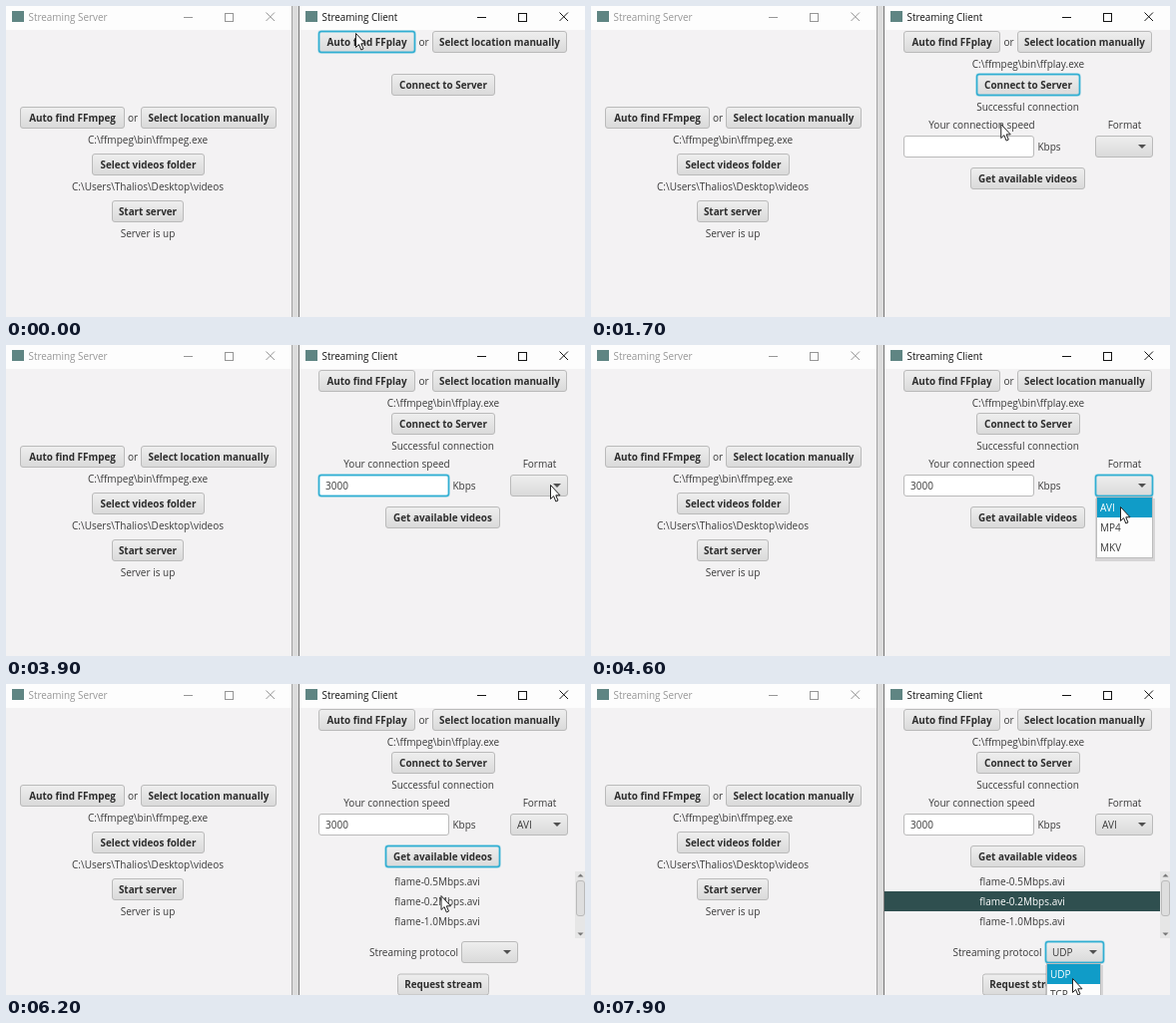
An HTML page with a canvas that plays this animation: 580x312 px, repeating every 8 s.

```html
<!DOCTYPE html>
<html lang="en">
<head>
<meta charset="utf-8">
<title>Streaming server and client</title>
<style>
  html, body { margin: 0; width: 100%; height: 100%; overflow: hidden; background: #f3f2f3; }
  canvas { display: block; }
</style>
</head>
<body>
<canvas id="stage" width="580" height="312"></canvas>
<script>
const ctx = document.getElementById('stage').getContext('2d');
const LOOP = 8000;
const FAMILY = '"Open Sans", "Noto Sans", sans-serif';
const INK = '#3a3a3a', BODY = '#f3f2f3', FOCUS = '#30aed2';

// Cursor tip: [time, x, y]
const cursorKeys = [
  [0, 350, 27], [300, 350, 27], [850, 420, 84], [1300, 420, 84],
  [2000, 404, 140], [3350, 404, 140], [3850, 545, 140], [4250, 545, 140],
  [4500, 530, 162], [4700, 530, 162], [5100, 432, 174], [5600, 432, 174],
  [6100, 435.5, 212], [6650, 435.5, 212], [7050, 490, 267], [7350, 490, 267],
  [7700, 482, 295], [LOOP, 482, 295]
];

const clamp = v => Math.min(1, Math.max(0, v));
const ramp = (t, start, length) => clamp((t - start) / length);
const within = (t, from, to) => t >= from && t < to;

function cursorAt(t) {
  const i = cursorKeys.findIndex(key => key[0] > t);
  const [t0, x0, y0] = cursorKeys[i - 1], [t1, x1, y1] = cursorKeys[i];
  const p = (t - t0) / (t1 - t0), e = p * p * (3 - 2 * p);
  return [x0 + (x1 - x0) * e, y0 + (y1 - y0) * e];
}

function text(str, x, y, { color = INK, bold = false, align = 'center', size = 10 } = {}) {
  ctx.font = `${bold ? 'bold ' : ''}${size}px ${FAMILY}`;
  ctx.textAlign = align;
  ctx.fillStyle = color;
  ctx.fillText(str, x, y + 3.5);
}

function rect(x, y, w, h, color) {
  ctx.fillStyle = color;
  ctx.fillRect(x, y, w, h);
}

function path(points, close) {
  ctx.beginPath();
  points.forEach(([x, y]) => ctx.lineTo(x, y));
  if (close) ctx.closePath();
}

function stroke(color, width = 1) {
  ctx.strokeStyle = color;
  ctx.lineWidth = width;
  ctx.stroke();
}

function box(x, y, w, h, fill, focused) {
  ctx.beginPath();
  ctx.roundRect(x + .5, y + .5, w - 1, h - 1, 2.5);
  ctx.fillStyle = fill;
  ctx.fill();
  if (focused) stroke('rgba(48,174,210,.25)', 3);
  stroke(focused ? FOCUS : '#bababa', focused ? 1.4 : 1);
}

function raised(x, y, w, h, focused) {
  const shade = ctx.createLinearGradient(0, y, 0, y + h);
  shade.addColorStop(0, '#efefef');
  shade.addColorStop(1, '#d9d9d9');
  box(x, y, w, h, shade, focused);
}

function button(label, x, y, w, focused) {
  raised(x, y, w, 22, focused);
  text(label, x + w / 2, y + 11, { bold: true, size: 9.9, color: '#2c2c2c' });
}

function triangle(x, y, half, height, color) {
  path([[x - half, y - height / 2], [x + half, y - height / 2], [x, y + height / 2]], true);
  ctx.fillStyle = color;
  ctx.fill();
}

function combo(x, y, w, value, focused) {
  raised(x, y, w, 22, focused);
  text(value, x + 7, y + 11, { align: 'left' });
  triangle(x + w - 11, y + 11, 4, 4, '#505050');
}

function popup(x, y, w, options, hovered) {
  rect(x - 1, y + 2, w + 3, options.length * 20 + 3, 'rgba(0,0,0,.12)');
  rect(x, y, w, options.length * 20 + 2, '#bdbdbd');
  rect(x + 1, y + 1, w - 2, options.length * 20, '#fdfdfd');
  options.forEach((option, i) => {
    const top = y + 1 + i * 20;
    if (i === hovered) rect(x + 1, top, w - 2, 20, '#109cc8');
    text(option, x + 4, top + 10, { align: 'left', color: i === hovered ? '#fff' : INK });
  });
}

function titleBar(title, x, w, color) {
  rect(x, 0, w, 24, '#fdfdfd');
  rect(x + 6, 5, 12, 11, '#5f8583');
  text(title, x + 22.5, 11.5, { align: 'left', color, size: 9.9 });
  path([[x + 178, 11.5], [x + 187, 11.5]]);
  stroke(color);
  ctx.strokeRect(x + 219.5, 7.5, 8, 8);
  path([[x + 260.5, 6.5], [x + 269, 15]]);
  stroke(color);
  path([[x + 269, 6.5], [x + 260.5, 15]]);
  stroke(color);
}

function faded(alpha, draw) {
  if (!alpha) return;
  ctx.globalAlpha = alpha;
  draw();
  ctx.globalAlpha = 1;
}

function server() {
  titleBar('Streaming Server', 0, 286, '#969696');
  button('Auto find FFmpeg', 14, 101, 105);
  text('or', 127, 112);
  button('Select location manually', 135, 101, 136);
  text('C:\\ffmpeg\\bin\\ffmpeg.exe', 142, 134);
  button('Select videos folder', 86, 148, 113);
  text('C:\\Users\\Thalios\\Desktop\\videos', 142, 181);
  button('Start server', 106, 195, 72);
  text('Server is up', 142, 228);
}

function speedForm(t) {
  const fieldFocused = within(t, 2200, 4050);
  text('Successful connection', 437.5, 101);
  text('Your connection speed', 391.5, 119);
  text('Format', 534.5, 119);
  box(313, 130, 131, 22, '#fff', fieldFocused);
  const typed = '3000'.slice(0, Math.max(0, Math.floor((t - 2400) / 100)));
  text(typed, 320, 141, { align: 'left', color: t < 2600 ? '#b8b8b8' : INK });
  if (fieldFocused && (t - 2200) % 1000 < 500)
    rect(320 + ctx.measureText(typed).width, 135, 1, 12, t < 2600 ? '#999' : INK);
  text('Kbps', 459, 141);
  combo(505, 130, 58, t < 4650 ? '' : 'AVI', within(t, 4050, 5150));
  button('Get available videos', 380, 162, 115, within(t, 5150, 6600));
}

function videoList(t) {
  ['flame-0.5Mbps.avi', 'flame-0.2Mbps.avi', 'flame-1.0Mbps.avi'].forEach((name, i) => {
    const selected = i === 1 && t >= 6600;
    if (selected) rect(294, 208, 276, 20, '#2f4f4f');
    text(name, 432, 198 + i * 20.4, { color: selected ? '#fff' : INK });
  });
  rect(570, 188, 10, 67, '#e6e6e6');
  box(571, 197, 9, 36, '#dedede');
  triangle(575.5, 192, 3, -3, '#777');
  triangle(575.5, 251, 3, 3, '#777');

  const chosen = t >= 7800;
  text('Streaming protocol', chosen ? 407 : 408.5, 269);
  combo(chosen ? 455 : 456, 258, chosen ? 59 : 57, chosen ? 'UDP' : '', t >= 7150);
  button('Request stream', 392, 290.5, 92);
}

function client(t) {
  titleBar('Streaming Client', 294, 286, '#151515');
  button('Auto find FFplay', 313, 25, 97, t < 900);
  text('or', 418.5, 36);
  button('Select location manually', 427, 25, 135);
  faded(ramp(t, 100, 400), () => text('C:\\ffmpeg\\bin\\ffplay.exe', 438, 58));
  button('Connect to Server', 386, 68, 104, within(t, 900, 2200));
  faded(ramp(t, 1150, 500), () => speedForm(t));
  faded(ramp(t, 5150, 500), () => videoList(t));
  if (within(t, 4050, 4650)) popup(506, 152, 57, ['AVI', 'MP4', 'MKV'], t > 4350 ? 0 : -1);
  if (t >= 7250) popup(456, 280, 55, ['UDP', 'TCP'], t > 7550 ? 0 : -1);
}

function cursor(t) {
  const [x, y] = cursorAt(t);
  ctx.save();
  ctx.translate(x, y);
  if (within(t, 1850, 3450)) {
    path([[-2.5, -6.5], [2.5, -6.5]]);
    ctx.moveTo(0, -6.5);
    ctx.lineTo(0, 6.5);
    ctx.moveTo(-2.5, 6.5);
    ctx.lineTo(2.5, 6.5);
    stroke('#111', 1.3);
  } else {
    path([[.5, .5], [.5, 14.5], [3.6, 11.6], [5.8, 17], [8, 16], [5.8, 10.8], [10, 10.8]], true);
    ctx.fillStyle = '#fff';
    ctx.fill();
    stroke('#222');
  }
  ctx.restore();
}

function draw(t) {
  rect(0, 0, 580, 312, BODY);
  server();
  rect(286, 0, 8, 312, '#dcdcdc');
  rect(286, 0, 1, 312, '#a2a2a2');
  rect(293, 0, 1, 312, '#777');
  client(t);
  cursor(t);
}

const start = performance.now();
function tick() {
  draw((performance.now() - start) % LOOP);
  requestAnimationFrame(tick);
}
tick();
</script>
</body>
</html>
```
